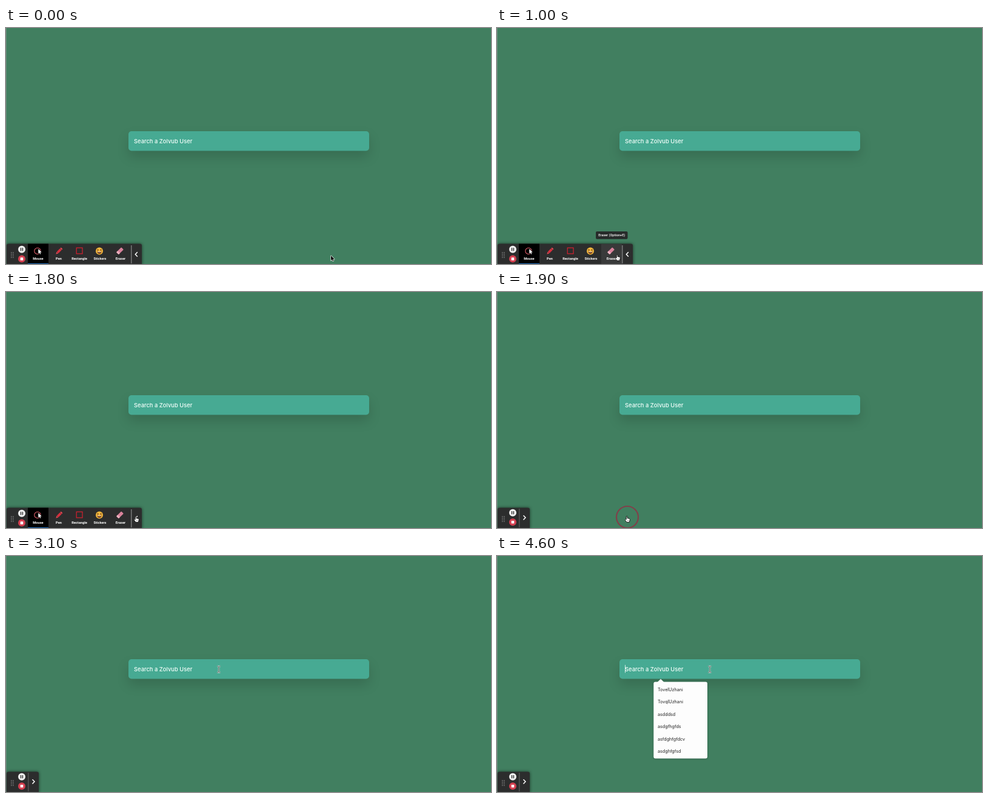
These frames come from a looping animation (800 by 391 pixels, 5000 ms). An HTML page with a canvas:

```html
<!DOCTYPE html>
<html lang="en">
<head>
<meta charset="utf-8">
<title>User search</title>
<style>
  html, body { margin: 0; width: 100%; height: 100%; overflow: hidden; background: #417f60; }
  canvas { display: block; }
</style>
</head>
<body>
<canvas id="stage" width="800" height="391"></canvas>
<script>
const LOOP = 5000, STEP = 100;
const ctx = document.getElementById('stage').getContext('2d');
const entries = ['TovelUzhani', 'TovqlUzhani', 'asdddsd', 'asdgfhgfds', 'asfdghfgfdcv', 'asdghfgfsd'];

// Pointer keys: time, x, y
const path = [
  [0, 536, 377], [100, 528, 377], [600, 300, 378], [900, 203, 376], [1000, 198, 375],
  [1200, 194, 374], [1400, 197, 374], [1800, 214, 371], [1900, 214, 371], [2000, 214, 373],
  [2400, 214, 373], [2500, 218, 362], [3000, 349, 192]
];

const clamp = v => Math.max(0, Math.min(1, v));
const smooth = v => v * v * (3 - 2 * v);

function pointerAt(t) {
  const i = path.findIndex(k => k[0] > t);
  if (i < 0) return path[path.length - 1].slice(1);
  const [t0, x0, y0] = path[i - 1], [t1, x1, y1] = path[i];
  const linear = (t - t0) / (t1 - t0);
  const p = t0 === 2500 ? smooth(linear) : linear;
  return [x0 + (x1 - x0) * p, y0 + (y1 - y0) * p];
}

function caretAlpha(t) {
  if (t < 3600) return 0;
  if (t < 4400) return clamp((4300 - t) / 300);
  return clamp((t - 4400) / 200);
}

function box(x, y, w, h, r, fill) {
  ctx.fillStyle = fill;
  ctx.beginPath();
  ctx.roundRect(x, y, w, h, r);
  ctx.fill();
}

function disc(x, y, r, fill) {
  ctx.fillStyle = fill;
  ctx.beginPath();
  ctx.arc(x, y, r, 0, Math.PI * 2);
  ctx.fill();
}

function ring(x, y, r, width, color) {
  ctx.strokeStyle = color;
  ctx.lineWidth = width;
  ctx.beginPath();
  ctx.arc(x, y, r, 0, Math.PI * 2);
  ctx.stroke();
}

function poly(points, fill) {
  ctx.beginPath();
  points.forEach(([x, y]) => ctx.lineTo(x, y));
  ctx.closePath();
  ctx.fillStyle = fill;
  ctx.fill();
}

function line(points, width, color) {
  ctx.beginPath();
  points.forEach(([x, y]) => ctx.lineTo(x, y));
  ctx.lineWidth = width;
  ctx.strokeStyle = color;
  ctx.stroke();
}

function label(text, x, y, font, color, align = 'left') {
  ctx.font = font;
  ctx.fillStyle = color;
  ctx.textAlign = align;
  ctx.fillText(text, x, y);
}

function at(x, y, angle, draw) {
  ctx.save();
  ctx.translate(x, y);
  ctx.rotate(angle);
  draw();
  ctx.restore();
}

function shadow(color, blur, dy, draw) {
  ctx.save();
  ctx.shadowColor = color;
  ctx.shadowBlur = blur;
  ctx.shadowOffsetY = dy;
  draw();
  ctx.restore();
}

function searchBar(t) {
  shadow('rgba(0,0,0,.15)', 20, 10, () => box(202, 171, 397, 32.5, 5, '#47aa93'));
  label('Search a Zolvub User', 211, 190.6, '500 9.4px Inter, sans-serif', '#f4fffb');
  ctx.globalAlpha = caretAlpha(t);
  box(211, 180.5, 0.8, 13, 0, '#fff');
  ctx.globalAlpha = 1;
}

function dropdown() {
  shadow('rgba(0,0,0,.25)', 3, 1, () => box(258.3, 208.5, 88.7, 127, 3, '#fdfdfd'));
  poly([[264.5, 209], [270, 203.7], [275.5, 209]], '#fdfdfd');
  entries.forEach((name, i) =>
    label(name, 265, 224 + i * 20.4, '400 7.2px Inter, sans-serif', '#222'));
}

function arrow(x, y, fill = '#111', edge = '#e8efeb', size = 1) {
  at(x, y, 0, () => {
    ctx.scale(size, size);
    const shape = [[0, 0], [0, 8.2], [1.9, 6.6], [3.1, 9.3], [4.4, 8.7], [3.2, 6.1], [5.7, 5.9]];
    ctx.lineJoin = 'round';
    line([...shape, shape[0]], 1.4, edge);
    poly(shape, fill);
  });
}

function hand(x, y) {
  at(x, y, 0, () => {
    ctx.beginPath();
    ctx.moveTo(-0.8, 6);
    ctx.lineTo(-0.8, 0.9);
    ctx.quadraticCurveTo(0, -0.6, 1, 0.9);
    ctx.lineTo(1, 3.8);
    ctx.lineTo(4.2, 4.3);
    ctx.quadraticCurveTo(5.5, 4.8, 5.2, 6.8);
    ctx.lineTo(4.2, 10.5);
    ctx.lineTo(0, 10.5);
    ctx.lineTo(-2.9, 6.5);
    ctx.quadraticCurveTo(-2.5, 5, -0.8, 6);
    ctx.closePath();
    ctx.fillStyle = '#fff';
    ctx.fill();
    ctx.lineWidth = 0.9;
    ctx.strokeStyle = '#111';
    ctx.stroke();
    line([[1.2, 7], [1.2, 9]], 0.5, '#555');
    line([[2.8, 7], [2.8, 9]], 0.5, '#555');
  });
}

function beam(x, y) {
  [[2.4, '#c5ddd5'], [1, '#3b4f49']].forEach(([width, color]) => {
    line([[x, y - 4], [x, y + 4]], width, color);
    line([[x - 2.5, y - 5], [x - 1, y - 5], [x, y - 4], [x + 1, y - 5], [x + 2.5, y - 5]], width, color);
    line([[x - 2.5, y + 5], [x - 1, y + 5], [x, y + 4], [x + 1, y + 5], [x + 2.5, y + 5]], width, color);
  });
}

const icons = {
  Mouse() {
    ring(52, 369.5, 5.2, 1.1, '#e2606c');
    arrow(53.3, 366, '#fff', '#000', 0.95);
  },
  Pen() {
    at(87.5, 369.5, Math.PI / 4, () => {
      box(-1.9, -6.5, 3.8, 2, 0.6, '#e34753');
      box(-1.9, -4, 3.8, 7.3, 0, '#d62f3d');
      poly([[-1.9, 3.7], [1.9, 3.7], [0, 7.3]], '#e34753');
    });
  },
  Rectangle() {
    ctx.strokeStyle = '#d8202f';
    ctx.lineWidth = 1.2;
    ctx.strokeRect(116.2, 364.2, 9.8, 9.8);
  },
  Stickers() {
    disc(154, 369.5, 6, '#f5b83d');
    line([[150.2, 366.6], [152.8, 367.8], [150.2, 368.6]], 0.9, '#6b3d13');
    line([[157.8, 366.6], [155.2, 367.8], [157.8, 368.6]], 0.9, '#6b3d13');
    ctx.beginPath();
    ctx.arc(154, 370.3, 3.6, 0, Math.PI);
    ctx.fillStyle = '#6b3516';
    ctx.fill();
    box(151.3, 370.3, 5.4, 1.1, 0, '#fff2d8');
  },
  Eraser() {
    at(188, 369.3, -Math.PI / 4, () => {
      box(-5.8, -2.7, 11.6, 5.4, 1, '#d9829b');
      box(-5.8, -2.7, 3.2, 5.4, 1, '#efb2c1');
    });
  }
};

function controls(pauseY, stopY) {
  for (let i = 0; i < 8; i++)
    box(8.3 + (i % 2) * 3, 371.5 + (i >> 1) * 2.7, 1.2, 1.2, 0, '#aaa');
  disc(26, pauseY, 6, '#f1f1f1');
  box(23.9, pauseY - 2.6, 1.3, 5.2, 0, '#222');
  box(26.8, pauseY - 2.6, 1.3, 5.2, 0, '#222');
  disc(26, stopY, 6, '#d43f50');
  box(23.7, stopY - 2.3, 4.6, 4.6, 0.5, '#fff');
}

function toolbar(open, hoverEraser) {
  const width = open ? 223 : 53;
  shadow('rgba(0,0,0,.6)', 5, 0, () => box(1, 357.5, width, 36, [3, 3, 0, 0], '#2c2d2d'));
  if (!open) {
    controls(365.7, 381.3);
    box(36.5, 359, 0.8, 31, 0, '#777');
    line([[43.5, 370.2], [47, 373.8], [43.5, 377.4]], 1.5, '#fff');
    return;
  }
  controls(366.8, 382.6);
  box(36, 357.5, 34, 34, 0, '#000');
  box(36, 390, 34, 1, 0, '#2878c8');
  if (hoverEraser) box(172, 358, 34, 33, 0, '#393a3a');
  Object.entries(icons).forEach(([name, draw], i) => {
    draw();
    label(name, 53 + i * 34, 384, '700 5.7px Roboto, sans-serif', '#fff', 'center');
  });
  box(206.4, 360, 0.9, 30, 0, '#aaa');
  line([[216.8, 371.3], [213.3, 375], [216.8, 378.7]], 1.5, '#fff');
  if (hoverEraser) {
    box(163, 337, 52.5, 12.8, 2, '#272b2a');
    label('Eraser (Option+E)', 189.2, 345.4, '500 5.6px Roboto, sans-serif', '#fff', 'center');
  }
}

function render(t) {
  const [x, y] = pointerAt(t);
  const open = t < 1900;
  const hoverEraser = open && x > 172 && x < 206;
  ctx.fillStyle = '#417f60';
  ctx.fillRect(0, 0, 800, 391);
  box(0, 0, 1, 391, 0, '#668b79');

  searchBar(t);
  if (t >= 3600) dropdown();
  toolbar(open, hoverEraser);

  if (t >= 1900 && t < 2000) ring(215, 373, 18, 2.2, '#80404a');
  if (t >= 3600 && t < 3800) ring(352, 188.3, 18, 2.2, '#80404a');

  if (t >= 3100) beam(351, 187.7);
  else if (t < 2000 && x < 224) hand(x, y);
  else arrow(x, y);
}

const start = performance.now();
function tick() {
  const t = (performance.now() - start) % LOOP;
  render(Math.floor(t / STEP) * STEP);
  requestAnimationFrame(tick);
}
tick();
</script>
</body>
</html>
```
